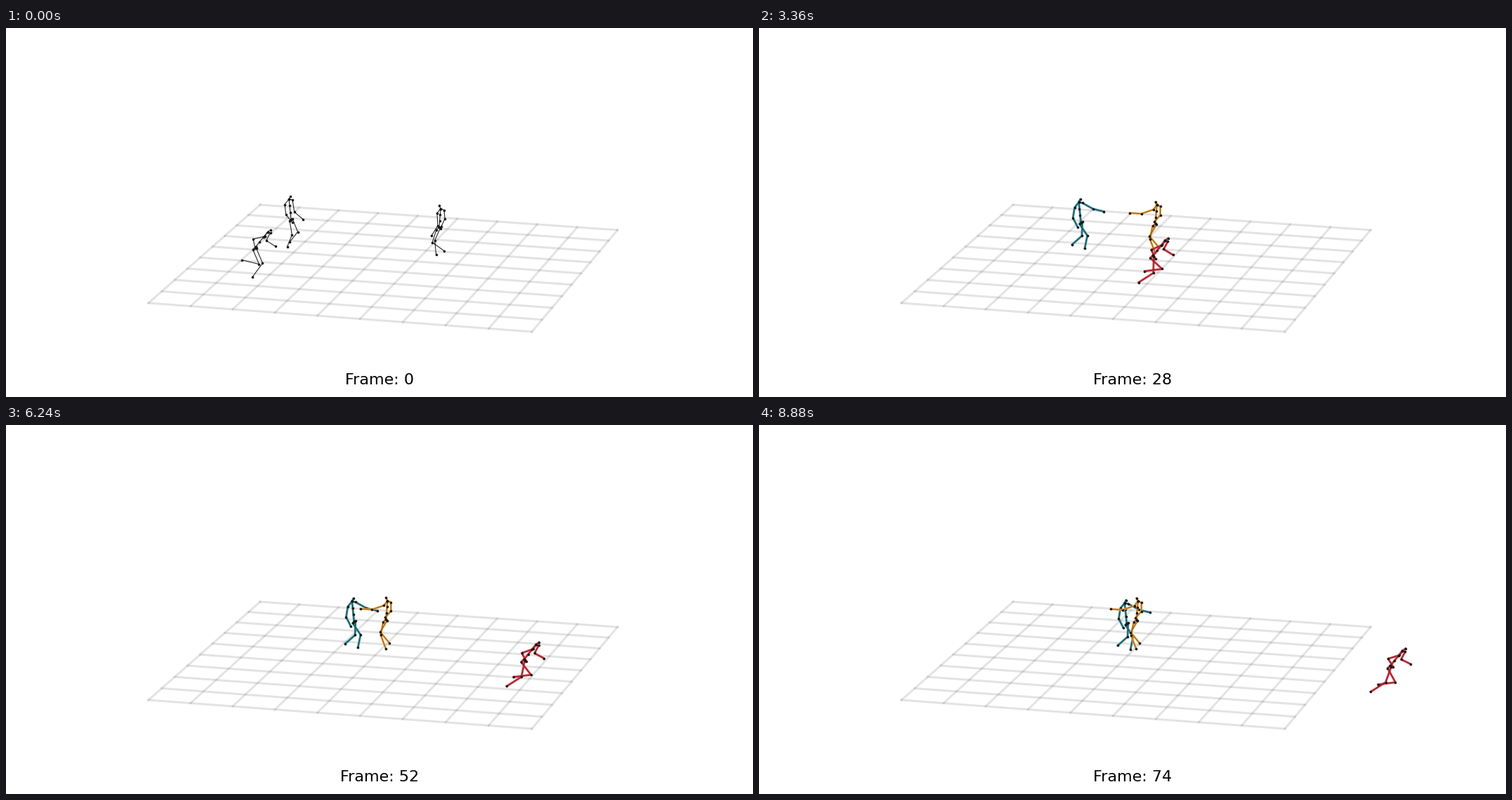
These frames come from a looping animation (1064 px wide and 526 px high, 9000 ms). A matplotlib script:

```python
import numpy as np
import matplotlib.pyplot as plt
from matplotlib.animation import FuncAnimation

W, H, DPI = 1064, 526, 100
FRAMES, STEP_MS = 75, 120
FORECAST = 25            # from here on the figures are coloured
PX = 72 / DPI            # points per pixel


def ease(t, start, end):
    s = np.clip((t - start) / (end - start), 0, 1)
    return s * s * (3 - 2 * s)


def limb(root, lengths, angles):
    """Two bones; angles in degrees from straight down, positive to the right."""
    pts = [np.array(root, float)]
    for size, a in zip(lengths, np.radians(angles)):
        pts.append(pts[-1] + size * np.array([np.sin(a), np.cos(a)]))
    return pts


class Walker:
    """Stick figure: the head follows a quadratic path, the legs a gait that stops.

    path:  x and y polynomials of the head
    trunk: head to neck, neck to pelvis
    gait:  start phase, degrees per frame, frame at which it stops
    thigh: mean, swing, drift after the stop; shin: mean, swing, lag
    arms:  shoulder offset, lengths, first and last angles, swing
    """

    def __init__(self, color, path, trunk, hips, legs, gait, thigh, shin,
                 arms, reach, facing=1):
        self.color, self.path, self.trunk = color, path, trunk
        self.hips, self.legs, self.gait = hips, legs, gait
        self.thigh, self.shin = thigh, shin
        self.arms, self.reach, self.facing = arms, reach, facing

    def leg(self, pelvis, hip, phase, drift):
        mean, swing, _ = self.thigh
        thigh = mean + swing * np.sin(np.radians(phase)) + drift
        mean, swing, lag = self.shin
        shin = mean + swing * np.cos(np.radians(phase - lag))
        bones = limb(pelvis + np.array(hip), self.legs,
                     (self.facing * thigh, self.facing * shin))
        return [pelvis, *bones]

    def arm(self, neck, t, phase, shoulder, lengths, first, last, swing):
        mix = ease(t, *self.reach)
        angles = (1 - mix) * np.array(first) + mix * np.array(last)
        angles = angles - swing * np.cos(np.radians(phase))
        return [neck, *limb(neck + np.array(shoulder), lengths, angles)]

    def chains(self, t):
        head = np.array([np.polyval(p, t) for p in self.path])
        neck = head + self.trunk[0]
        pelvis = neck + self.trunk[1]
        spine = [head] + [neck + (pelvis - neck) * f for f in (0, 0.32, 0.65, 1)]
        start, rate, stop = self.gait
        phase = start + rate * min(t, stop)
        drift = self.thigh[2] * max(t - stop, 0)
        arms = [self.arm(neck, t, phase, *a) for a in self.arms]
        legs = [self.leg(pelvis, hip, phase + 180 * k, drift)
                for k, hip in enumerate(self.hips)]
        return [spine, *arms, *legs]


walkers = [
    Walker("#2f8f9b", path=[(-0.0062, 2.05, 405), (-0.0005, 0.17, 240)],
           trunk=[(-2, 4), (3, 29)], hips=[(-2, 2), (2, -1)], legs=(20, 18.5),
           gait=(200, 12.5, 20), thigh=(16, 18, 0), shin=(-30, 24, 130),
           arms=[((-6, 7.5), (15, 14.5), (7, 40), (-9, 27), 0),
                 ((5, 1), (17.5, 16), (9, 50), (61, 76), 0)],
           reach=(0, 13)),
    Walker("#fbab42", path=[(0.0174, -2.36, 617), (0.0021, -0.24, 253)],
           trunk=[(2, 4.5), (-2, 26.5)], hips=[(-4, 3.5), (1.5, 1.5)], legs=(19, 20.5),
           gait=(350, 10, 22), thigh=(21, 20, 0), shin=(-30, 28, 140),
           arms=[((5, 2), (12.5, 12.5), (5, -25), (0, -42), 0),
                 ((-5, 6.5), (18, 16.5), (3, -32), (-71, -94), 0)],
           reach=(2, 25), facing=-1),
    Walker("#e83a45", path=[(7.35, 377), (-0.0004, 0.45, 287.5)],
           trunk=[(-4.5, 3.5), (-17, 21)], hips=[(-4, 3.5), (1, 2)], legs=(23, 25),
           gait=(0, 15, 27.3), thigh=(23, 32, -0.4), shin=(-70, 36, 160),
           arms=[((-4, 6), (17, 14), (-45, 45), (-52, 52), 32),
                 ((4, 1), (12.5, 15.5), (-28, 58), (-28, 64), 0)],
           reach=(20, 74)),
]


def ground(corners):
    """Perspective map from the unit square to four corners."""
    rows, rhs = [], []
    for (u, v), (x, y) in zip([(0, 0), (1, 0), (1, 1), (0, 1)], corners):
        rows += [[u, v, 1, 0, 0, 0, -u * x, -v * x], [0, 0, 0, u, v, 1, -u * y, -v * y]]
        rhs += [x, y]
    m = np.append(np.linalg.solve(rows, rhs), 1).reshape(3, 3)

    def project(u, v):
        x, y, w = m @ (u, v, 1)
        return x / w, y / w
    return project


fig = plt.figure(figsize=(W / DPI, H / DPI), dpi=DPI, facecolor="white")
ax = fig.add_axes([0, 0, 1, 1])
ax.set_xlim(0, W)
ax.set_ylim(H, 0)
ax.axis("off")

project = ground([(362, 252), (871, 288), (749, 433), (203, 392)])
for s in np.linspace(0, 1, 10):
    for ends in ([(s, 0), (s, 1)], [(0, s), (1, s)]):
        xs, ys = zip(*(project(*e) for e in ends))
        ax.plot(xs, ys, color="black", alpha=0.11, lw=3 * PX, zorder=1)

label = ax.text(W / 2, 508, "", fontsize=16, family="DejaVu Sans",
                ha="center", va="baseline", color="black")

people = []
for z, who in enumerate(walkers):
    glow, = ax.plot([], [], color=who.color, lw=3 * PX, zorder=3 + 3 * z)
    bones, = ax.plot([], [], color="#222222", lw=1.1 * PX, zorder=4 + 3 * z)
    dots, = ax.plot([], [], "o", color="#181818", ms=3.6 * PX, mew=0, zorder=5 + 3 * z)
    people.append((who, glow, bones, dots))


def draw(t):
    label.set_text(f"Frame: {t}")
    forecast = t >= FORECAST
    for who, glow, bones, dots in people:
        gap = (np.nan, np.nan)
        line = np.array([p for chain in who.chains(t) for p in (*chain, gap)]).T
        for artist in (glow, bones, dots):
            artist.set_data(*line)
        glow.set_visible(forecast)
        bones.set_alpha(0.55 if forecast else 1)


anim = FuncAnimation(fig, draw, frames=FRAMES, init_func=lambda: draw(0),
                     interval=STEP_MS, repeat=True, repeat_delay=0)
plt.show()
```
